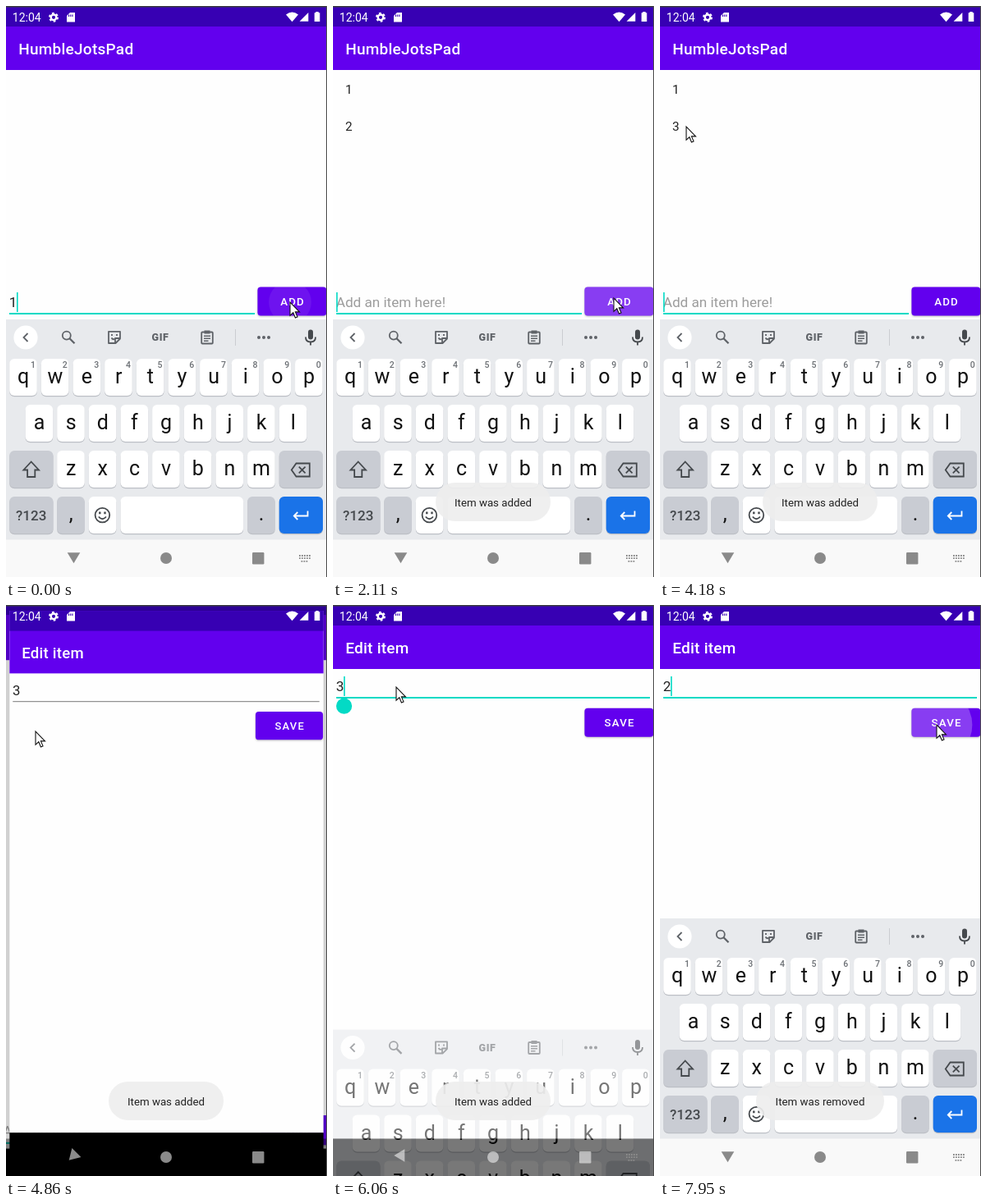
These frames come from a looping animation (391x696 px, 8 s). An HTML page:

```html
<!DOCTYPE html>
<html lang="en">
<head>
<meta charset="utf-8">
<title>Todo list</title>
<style>
  html, body { margin: 0; width: 100%; height: 100%; overflow: hidden; background: #fefefe; }
  svg { display: block; width: 100%; height: 100%; font-family: Roboto, sans-serif; }
  .title { font: 500 19.02px Roboto, sans-serif; letter-spacing: .24px; fill: #fff; }
  .item { font-size: 15.2px; fill: #212121; }
  .field { font-size: 17.1px; fill: #212121; }
  .hint { fill: #9c9c9c; }
  .label { font: 500 13.3px Roboto, sans-serif; letter-spacing: 1.19px; fill: #fff; }
  .button { filter: drop-shadow(0 1px 1px rgba(0, 0, 0, .25)); }
  .mid { text-anchor: middle; }
  .letter { font-size: 25px; fill: #111; }
  .digit { font: 500 10.5px Roboto, sans-serif; fill: #6b6f74; }
  .line { fill: none; stroke: #5f6368; stroke-width: 1.8; }
  .dark { stroke: #45494d; }
  .toast { font-size: 13.3px; fill: #222; }
  .teal { fill: #03dac5; }
</style>
</head>
<body>
<svg viewBox="0 0 391 696" preserveAspectRatio="none">
  <defs><clipPath id="face"><rect width="84" height="35" rx="4"/></clipPath></defs>

  <g id="main">
    <g class="screen"></g>
    <text class="title" x="15.2" y="59">HumbleJotsPad</text>
    <g id="items"></g>
    <g id="entry">
      <text id="mainText" class="field" x="3.8" y="367"></text>
      <rect class="teal" x="4" y="374" width="299" height="2"/>
      <rect id="mainCaret" class="teal" y="349" width="1.6" height="24"/>
      <g id="add" transform="translate(306.4 342.4)"></g>
    </g>
  </g>
  <rect id="dim" width="391" height="696"/>

  <g id="edit">
    <g class="screen"></g>
    <text class="title" x="15.2" y="59">Edit item</text>
    <text id="editText" class="field" x="3.8" y="105"></text>
    <rect id="editLine" x="4" width="382"/>
    <rect id="editCaret" class="teal" x="13" y="87" width="1.6" height="24"/>
    <path id="handle" class="teal" d="M13.5 112L20.2 116.3A9.6 9.6 0 1 1 6.8 116.3Z"/>
    <g id="save" transform="translate(306.4 125.8)"></g>
  </g>

  <g id="keyboard"></g>
  <rect id="navShade" y="650.5" width="391" height="46"/>

  <g id="nav">
    <path id="back" d="M8.2 0L-4.8 -7.8V7.8Z"/>
    <circle cx="195" cy="673" r="7"/>
    <rect x="300" y="666" width="14.4" height="14.4" rx="1.2"/>
    <path id="imeIcon" d="M357 670H371M357 673.2H371M359.5 676.8H368.5" stroke="#8a8a8a" stroke-width="1.8" stroke-dasharray="1.8 1.2"/>
  </g>

  <g fill="#fff">
    <text x="7.8" y="19" font-size="14">12:04</text>
    <g fill="none" stroke="#fff">
      <circle cx="58" cy="13.8" r="3.3" stroke-width="2.4"/>
      <circle cx="58" cy="13.8" r="5.1" stroke-width="1.8" stroke-dasharray="2.67"/>
    </g>
    <path d="M78 8H84V19.5H74V12Z"/>
    <path d="M76 11.7H82.5" stroke="#3700b3" stroke-width="2.4" stroke-dasharray="1.1"/>
    <path d="M348.5 19.2L341 10.4Q348.5 4.8 356 10.4Z"/>
    <path d="M368.3 8V18.8H357.6Z"/>
    <path d="M377.3 8.2V7H380.7V8.2H382.3V19H375.7V8.2Z"/>
  </g>

  <g id="toast">
    <rect id="pill" y="581" height="47" rx="23.5" fill="#eee" opacity=".91"/>
    <text id="toastText" class="toast mid" x="195" y="609.6"></text>
  </g>

  <path id="pointer" d="M0 0V16.3L3.8 12.8L6.4 19L9 17.9L6.4 11.9H11.5Z" fill="#fff" stroke="#111" stroke-width="1.1"/>
  <path d="M0 .75H391" stroke="#3c3f41" stroke-width="1.5"/>
  <path d="M390.5 0V696" stroke="#4a4a4a"/>
</svg>

<script>
const $ = id => document.getElementById(id);
const put = (id, attrs) => { for (const k in attrs) $(id).setAttribute(k, attrs[k]); };
const write = (id, text) => { if ($(id).textContent !== text) $(id).textContent = text; };
const ramp = (t, from, to) => Math.min(1, Math.max(0, (t - from) / (to - from)));
const within = (t, from, to) => t >= from && t < to;

// Static parts
document.querySelectorAll('.screen').forEach(g => g.innerHTML = `
  <rect width="391" height="651" fill="#fefefe"/>
  <rect y="650.5" width="391" height="46"/>
  <rect width="391" height="78" fill="#6200ee"/>
  <rect width="391" height="25" fill="#3700b3"/>`);

for (const id of ['add', 'save']) $(id).innerHTML = `
  <rect class="button" width="84" height="35" rx="4" fill="#6200ee"/>
  <g clip-path="url(#face)"><circle id="${id}Ripple" fill="#fff"/></g>
  <text class="label mid" x="42.7" y="22.4">${id.toUpperCase()}</text>`;

const gray = '#c9ccd3', pitch = 38.65;
const rowY = row => 430 + row * 56;

function key(x, row, label = '', w = 33.6, fill = '#fff') {
  const box = (y, color) => `<rect x="${x}" y="${y}" width="${w}" height="45" rx="6" fill="${color}"/>`;
  return box(rowY(row) + 1.2, '#bcbfc5') + box(rowY(row), fill) +
    `<text class="letter mid" x="${x + 17}" y="${460.3 + row * 55.7}">${label}</text>`;
}

const letters = ['qwertyuiop', 'asdfghjkl', 'zxcvbnm'].map((chars, row) =>
  [...chars].map((c, i) => key(4.2 + (i + (10 - chars.length) / 2) * pitch, row, c)).join('')).join('');
const digits = [...'1234567890'].map((c, i) =>
  `<text class="digit mid" x="${33 + i * pitch}" y="441.3">${c}</text>`).join('');
const wide = [[4.2, 2], [332.7, 2], [4.2, 3]].map(([x, row]) => key(x, row, '', 53.3, gray)).join('');
const dots = [308, 314, 320].map(x => `<circle cx="${x}" cy="404" r="2"/>`).join('');

$('keyboard').innerHTML = `
  <rect y="382" width="391" height="270" fill="#e8eaed"/>
  <rect y="650.5" width="391" height="46" fill="#f9f9f9"/>
  <circle cx="24" cy="404" r="14.6" fill="#fff"/>
  ${letters}${digits}${wide}
  ${key(4.2 + 1.5 * pitch, 3, ',', 33.6, gray)}${key(4.2 + 2.5 * pitch, 3)}
  ${key(4.2 + 3.5 * pitch, 3, '', 149.6)}${key(4.2 + 7.5 * pitch, 3, '.', 33.6, gray)}
  ${key(332.7, 3, '', 53.3, '#1a73e8')}
  <g class="line">
    <path d="M26.5 399L21.5 404L26.5 409"/>
    <circle cx="73.8" cy="401.6" r="5"/><path d="M77.5 405.3L83.5 411.3" stroke-width="2.3"/>
    <path d="M125 396.8H139V405.5L133.5 411H125ZM139 405H133V411" stroke-linejoin="round"/>
    <path d="M128.5 404.5Q130 407 132.5 406M129 400V402M135 400V402"/>
    <rect x="238.2" y="397.5" width="13.6" height="14" rx="1"/>
    <path d="M241 402.2H249M241 405.2H249M241 408.2H246.5" stroke-width="1.5"/>
    <path d="M241.5 397.5H248.5" stroke-width="4"/>
    <path d="M279.5 394V414" stroke="#cbcdd1" stroke-width="1"/>
    <g class="dark">
      <path d="M365 403.5Q365 409.5 371 409.5T377 403.5M371 409.5V413.5"/>
      <path d="M371 397.5V403.5" stroke-width="6" stroke-linecap="round"/>
      <path d="M30.7 555.5L40 565.5H35.3V574H26.1V565.5H21.4Z"/>
      <path d="M353.5 557.5H369.8V573.5H353.5L347.8 565.5ZM356.8 561.7L364.6 569.3M364.6 561.7L356.8 569.3"/>
      <circle cx="117.4" cy="620.6" r="8.8"/><path d="M112.8 622.5Q117.4 628 122 622.5"/>
      <path d="M114.3 616.6V619.2M120.5 616.6V619.2" stroke-width="2.4"/>
    </g>
    <path d="M367.5 615.5V621.5H351M355.3 617L350.8 621.5L355.3 626" stroke="#fff"/>
  </g>
  <g fill="#5f6368">${dots}
    <text class="mid" x="188" y="408.4" font-size="12.5" font-weight="900" letter-spacing=".6">GIF</text>
    <text class="mid" x="30.7" y="626.8" font-size="17" font-weight="500" fill="#45494d">?123</text>
  </g>`;

// Timeline
const LOOP = 8000, STEP = 135;
const entries = [
  { text: '1', type: -1, down: -30, up: 1190 },
  { text: '2', type: 1460, down: 1780, up: 2120 },
  { text: '3', type: 2510, down: 2640, up: 2900 }
];
const savePress = { down: 7724, up: LOOP };
const added = e => e.down + 160;
const removeAt = 3630, openAt = 4590, focusAt = 5670, retypeAt = 6700;
const toastStarts = [400, 2480, 3860, 6250];

// Pointer strokes: start, end, x, y
const strokes = [[120, 790, 339, 361], [1350, 1890, 342, 356], [2835, 3105, 210, 147], [3645, 4050, 32, 147],
  [4480, 4725, 36, 154], [5010, 5400, 77, 100], [6570, 6885, 110, 106], [7270, 7690, 337, 146]];

function pointerAt(t) {
  let x = 346, y = 361;
  for (const [from, to, toX, toY] of strokes) {
    const k = ramp(t, from, to);
    x += (toX - x) * k;
    y += (toY - y) * k;
  }
  return [x, y];
}

function ripple(id, t, press, top) {
  if (!press) return put(id, { opacity: 0 });
  const [x, y] = pointerAt(press.down), age = t - press.down;
  put(id, {
    cx: x - 306.4, cy: y - top, r: 19 + age * .23,
    opacity: Math.min(.24, age * .0025) * (1 - ramp(t, press.up, press.up + 100))
  });
}

const zoom = (s, y) => `translate(195.5 ${y}) scale(${s}) translate(-195.5 ${-y})`;

function drawMain(t) {
  const list = entries.filter(e => t >= added(e) && !(e.text === '2' && t >= removeAt));
  $('items').innerHTML = list.map((e, i) =>
    `<text class="item" x="14.9" y="${106.6 + i * 45.6}">${e.text}</text>`).join('');

  const typing = entries.find(e => within(t, e.type, added(e)));
  write('mainText', typing ? typing.text : 'Add an item here!');
  $('mainText').classList.toggle('hint', !typing);
  put('mainCaret', { x: typing ? 13 : 4, opacity: within(t, removeAt, removeAt + 370) ? 0 : 1 });
  put('entry', { transform: `translate(0 ${t < openAt ? 0 : 269})` });
  ripple('addRipple', t, entries.find(e => within(t, e.down, e.up + 100)), 342.4);
}

function drawEdit(t) {
  const p = ramp(t, openAt, openAt + 3 * STEP), eased = 1 - (1 - p) ** 2;
  put('main', { transform: zoom(1 + .045 * eased, 348) });
  put('dim', { opacity: .2 * eased });
  put('edit', { transform: zoom(.8 + .2 * eased, 320), opacity: Math.min(1, p * 1.6) });

  const focused = t >= focusAt, empty = within(t, retypeAt, retypeAt + STEP);
  write('editText', empty ? '' : t < retypeAt ? '3' : '2');
  put('editLine', focused ? { y: 112, height: 2, fill: '#03dac5' } : { y: 112.6, height: 1, fill: '#777' });
  put('editCaret', { x: empty ? 4 : 13, opacity: focused && !within(t, 7400, 7680) ? 1 : 0 });
  put('handle', { opacity: focused && t < retypeAt ? 1 : 0 });
  ripple('saveRipple', t, t >= savePress.down && savePress, 125.8);
}

function drawSystem(t) {
  const shown = 1 - ramp(t, 4480, 4800) + ramp(t, focusAt, focusAt + 475);
  const turn = ramp(t, openAt, openAt + 540) - ramp(t, 5940, 6210);
  put('keyboard', { transform: `translate(0 ${314 * (1 - shown)})`, opacity: shown });
  put('navShade', { opacity: .4 * (1 - shown) });
  put('nav', { fill: shown > .8 ? '#8a8a8a' : 'rgba(255,255,255,.54)' });
  put('back', { transform: `translate(82.5 671) rotate(${90 + 90 * turn})` });
  put('imeIcon', { opacity: shown > .4 ? 1 : 0 });

  const removed = t >= toastStarts[3];
  const width = removed ? 156 : 140;
  const gap = Math.min(...toastStarts.map(s => Math.abs(t - s)));
  write('toastText', removed ? 'Item was removed' : 'Item was added');
  put('pill', { x: 195 - width / 2, width });
  put('toast', { opacity: t < toastStarts[0] ? 0 : ramp(gap, 0, 180) });
  put('pointer', { transform: `translate(${pointerAt(t)})` });
}

function tick() {
  const t = Math.floor(performance.now() % LOOP / STEP) * STEP;
  drawMain(t);
  drawEdit(t);
  drawSystem(t);
  requestAnimationFrame(tick);
}
tick();
</script>
</body>
</html>
```
